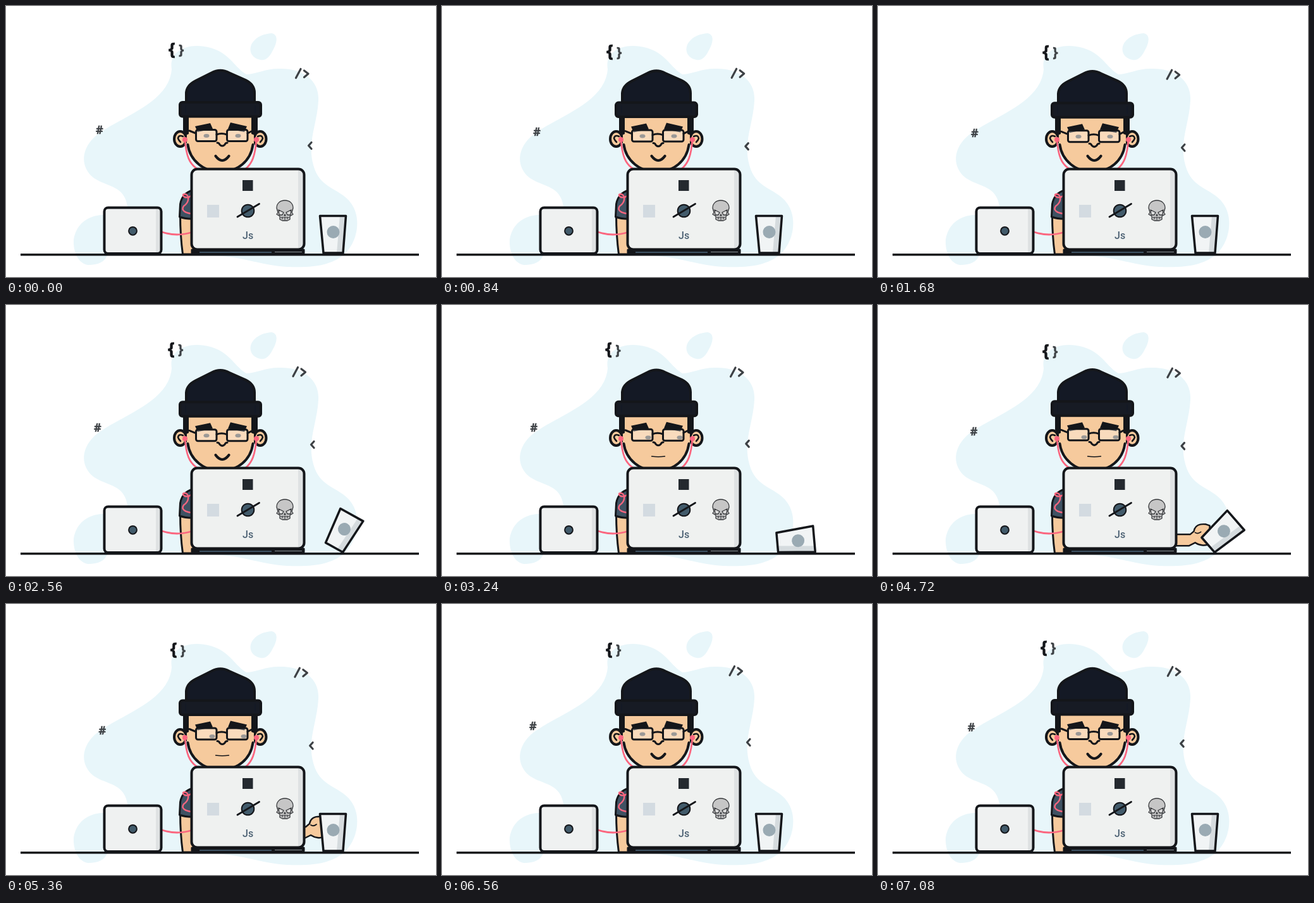
Animation, 680 px wide and 428 px high, one loop 7120 ms. Source, as an HTML page:

```html
<!DOCTYPE html>
<html lang="en">
<head>
<meta charset="utf-8">
<title>Coder at a desk</title>
<style>
  html, body { margin: 0; width: 100%; height: 100%; overflow: hidden; background: #fff; }
  svg { display: block; width: 680px; height: 428px; }
  .o { stroke: #14161a; stroke-width: 4; stroke-linejoin: round; stroke-linecap: round; }
  .n { fill: none; }
  .skin { fill: #f6ca9d; }
  .pink { fill: none; stroke: #fb667f; stroke-width: 2.8; stroke-linecap: round; }
  .sign { fill: none; stroke: #3d4145; stroke-width: 3.2; stroke-linejoin: round; stroke-linecap: round; }
  text { font-family: "Open Sans", "Noto Sans", sans-serif; font-weight: 700; fill: #3d4145; }
</style>
</head>
<body>
<svg viewBox="0 0 680 428">
  <!-- backdrop -->
  <g fill="#e8f6fa">
    <path d="M262 100C258 78 275 63 302 63C350 64 358 95 380 108C398 107 412 98 435 99C470 99 496 118 494 150C492 187 476 215 486 251C496 290 530 288 546 312C562 334 557 372 535 392C512 412 478 413 445 412C405 410 380 397 330 394H192V316C186 276 146 288 129 261C115 239 128 212 152 198C188 173 258 151 262 100Z"/>
    <path d="M160 394C156 404 146 409 130 409C114 407 106 388 107 369C111 344 130 331 152 330H172V394Z"/>
    <path d="M420 43C431 45 429 58 422 70C417 80 411 87 402 85C388 82 383 70 389 59C396 48 408 44 420 43Z"/>
  </g>

  <!-- floating signs -->
  <g id="braces">
    <text x="257" y="76.500" font-size="27" style="fill:#14161a;stroke:#14161a;stroke-width:.6">{</text>
    <text x="273" y="76" font-size="21" stroke="#3d4145" stroke-width=".4">}</text>
  </g>
  <g id="hash"><text x="142" y="201.700" font-size="18" stroke="#3d4145" stroke-width=".4">#</text></g>
  <g id="tag"><path class="sign" d="M458.500 113.500L466 99.500M471.500 102L478 107L471.500 112.500"/></g>
  <g id="less"><path class="sign" d="M483 215.500L478.500 220.500L483 225.500"/></g>

  <!-- body -->
  <g class="o" style="stroke-width:3">
    <path class="skin" d="M275.500 330Q275.500 362 279.500 392H310V330Z"/>
    <path fill="#3f5263" d="M300 290Q279 293 275.500 313L274.500 333Q285 337 300 336Z"/>
  </g>

  <!-- head -->
  <g class="o skin">
    <ellipse cx="275.500" cy="210" rx="9.500" ry="12"/>
    <ellipse cx="402" cy="210" rx="9.500" ry="12"/>
    <path class="n" style="fill:none;stroke-width:2.500" d="M280 206Q273 203 272 209Q273 212 276 215M398 206Q405 203 406 209Q405 212 402 215"/>
    <path stroke="none" style="stroke:none" d="M286 170V217C290 245 314 262 339 262C366 262 388 245 392 217V170Z"/>
    <path class="n" style="fill:none" d="M287.500 219C291 245 314 262 339 262C366 262 387 245 390.500 219"/>
  </g>
  <path fill="#14161a" d="M280 172H289V202L285 204L280 197ZM388 172H398V197L393 204L388 202Z"/>
  <g id="head">
    <path fill="#14161a" d="M299 190L323 185L327 194L303 199ZM381 190L355 184L351 194L377 199Z"/>
    <g id="eyes" fill="#6c6865">
      <ellipse cx="317" cy="205" rx="4.500" ry="3"/>
      <ellipse cx="367" cy="205" rx="4.500" ry="3"/>
    </g>
    <g class="o" style="stroke-width:3" fill="#fff" fill-opacity=".32">
      <rect x="300.500" y="195.500" width="32.500" height="18" rx="3"/>
      <rect x="349.500" y="195.500" width="32.500" height="18" rx="3"/>
      <path class="n" d="M333 203Q341 200 349 203M300 201L290 197M382 201L390 197"/>
    </g>
    <path class="o n" style="stroke-width:3" d="M334 216Q337 216 338 219Q342 223 346 219Q347 216 350 216"/>
    <path class="o" fill="#141925" d="M285 155V137Q286 125 300 118L325 105.500Q339 98 353 105.500L379 117Q393 124 393 137V155Z"/>
    <rect class="o" x="275" y="152" width="128" height="22.500" rx="4" fill="#171b24"/>
    <path stroke="#141925" stroke-width="2" d="M284 157V169M394 157V169"/>
  </g>
  <path id="mouth" class="o n"/>

  <!-- earphones -->
  <path class="pink" d="M283 211C285 237 290 249 302 257M396 211C394 237 389 249 379 257"/>
  <g fill="#fb667f"><circle cx="283" cy="211" r="4"/><circle cx="396" cy="211" r="4"/></g>
  <path class="pink" style="stroke-width:2.300" d="M294 299C284 307 276 298 282 297C290 297 291 309 281 316C276 323 284 327 294 328"/>

  <path class="o n" style="stroke-width:3.500;stroke-linecap:butt" d="M23 392.700H653"/>

  <!-- reaching hand -->
  <g id="hand">
    <path class="o skin" style="stroke-width:2.500" d="M405 352H474L480 347C482 337 489 335 499 336L505 338V367C497 371 488 369 482 365L472 370H405Z"/>
    <path class="o n" style="stroke-width:1.800" d="M482 349Q486 352 491 348"/>
  </g>

  <!-- cup -->
  <g id="cup">
    <path fill="#f1f4f5" d="M496 331H538L533 390H502Z"/>
    <path fill="#d5dbde" d="M528 331H538L533 390H523Z"/>
    <circle cx="517.500" cy="357" r="10" fill="#9aaab3"/>
    <path class="o n" style="stroke-width:3.500" d="M496.500 331.500H537.500L533 390H502Z"/>
  </g>

  <!-- small laptop -->
  <path class="pink" d="M247 357Q270 365 295 357"/>
  <rect x="155.500" y="318.500" width="90" height="72.500" rx="6" fill="#eff1f1"/>
  <path fill="#dfe2e3" d="M237 320H241Q245 320 245 325V386Q245 390 241 390H237Z"/>
  <rect class="o n" x="155.500" y="318.500" width="90" height="72.500" rx="6"/>
  <circle class="o" style="stroke-width:2" cx="200.500" cy="355.300" r="6.400" fill="#425b6b"/>

  <!-- large laptop -->
  <path class="o" style="stroke-width:3" fill="#14161a" d="M294 385H471V390H294Z"/>
  <path stroke="#3f5364" stroke-width="2" d="M306 389H420"/>
  <path stroke="#8f979c" d="M425 388.500H468"/>
  <rect x="293.500" y="257.500" width="178" height="127" rx="9" fill="#eff1f0"/>
  <path fill="#dfe2e3" d="M462 259H464Q470 260 470 267V376Q470 383 463 383H462Z"/>
  <rect class="o n" x="293.500" y="257.500" width="178" height="127" rx="9"/>
  <rect x="374" y="275" width="16.500" height="17" fill="#24292f"/>
  <rect x="318" y="314" width="19" height="20" fill="#d3dbe1"/>
  <circle class="o" style="stroke-width:2" cx="382.500" cy="323.500" r="9.800" fill="#425b6b"/>
  <path class="o" style="stroke-width:2.800" d="M366 333L400.500 312.500"/>
  <text x="374" y="367.500" font-size="16" style="font-family:Roboto,sans-serif;font-weight:500;fill:#4b6072">Js</text>

  <!-- skull sticker -->
  <g stroke="#35373a" stroke-width="1.300" stroke-linejoin="round">
    <path fill="#c6c6c6" d="M441 307C449 307 454 312 454 319L452 326L454 329L449 332V337L445 339H437L433 337V332L428 329L430 326L428 319C428 312 433 307 441 307Z"/>
    <path fill="#dadada" d="M431 322L439 326L437 330H432ZM451 322L443 326L445 330H450Z"/>
    <path fill="#35373a" d="M441 329L440 331H442Z"/>
    <path fill="none" stroke-width="1" d="M434 334H448M437 333V337M441 333V338M445 333V337"/>
  </g>
</svg>

<script>
const LOOP = 7120, DRIFT = 3560, STEP = 40;
const $ = id => document.getElementById(id);
const clamp = v => Math.max(0, Math.min(1, v));
const line = (t, a, b) => clamp((t - a) / (b - a));
const ease = (t, a, b) => { const p = line(t, a, b); return p * p * (3 - 2 * p); };
const mix = (a, b, p) => a + (b - a) * p;
const move = (id, x, y) => $(id).setAttribute('transform', `translate(${x} ${y})`);

// Smooth periodic curve through [time, x, y] points.
function curve(keys, period, t) {
  t %= period;
  const n = keys.length;
  const at = i => {
    const turn = Math.floor(i / n), [k, ...v] = keys[i - turn * n];
    return [k + turn * period, ...v];
  };
  let i = n - 1;
  while (keys[i][0] > t) i--;
  const [a, b, c, d] = [at(i - 1), at(i), at(i + 1), at(i + 2)];
  const h = c[0] - b[0], p = (t - b[0]) / h;
  return [1, 2].map(k => {
    const m = (c[k] - a[k]) / (c[0] - a[0]) * h;
    const q = (d[k] - b[k]) / (d[0] - b[0]) * h;
    return b[k] + p * m + p * p * (3 * (c[k] - b[k]) - 2 * m - q)
      + p * p * p * (2 * (b[k] - c[k]) + m + q);
  });
}

const drifts = {
  braces: [[0, 0, 0], [440, 2.5, 2], [1000, 3, 4], [1740, 3, 4], [2350, -1, .3], [2560, -1, 1], [3000, 2, 3]],
  hash: [[0, 0, 0], [440, 0, 2], [1000, 3, 4], [1740, 4.8, 4.7], [2560, -3, -2], [3000, -4, -3]],
  tag: [[0, 0, 0], [440, 0, -1], [1740, -1.5, 1.7], [2560, -4.5, -1], [3000, -3.5, -1]],
  less: [[0, 0, 0], [440, 1, 0], [1740, 2, 3.3], [2560, 4, 0], [3000, 4, -2]]
};
const bob = [[0, 0, 0], [1680, 0, 1.3], [2560, 0, 1.3], [4000, 0, .2], [5360, 0, .5], [6560, 0, .5]];

function draw(t) {
  for (const id in drifts) move(id, ...curve(drifts[id], DRIFT, t));
  move('head', ...curve(bob, LOOP, t));

  const worry = ease(t, 2800, 3040) - ease(t, 5720, 5960);
  move('eyes', 9 * worry, 3.5 * worry);
  const y = mix(237, 239, worry);
  $('mouth').setAttribute('d', `M331.500 ${y}Q342 ${mix(251, 240.5, worry)} 352.500 ${y}`);
  $('mouth').style.strokeWidth = mix(4.2, 1.3, worry);

  const lift = ease(t, 4450, 5050);
  const angle = 85 * (line(t, 2200, 2880) ** 1.7 - lift);
  $('cup').setAttribute('transform', `rotate(${angle} 532 389.5)`);

  const reach = ease(t, 4050, 4420), away = ease(t, 5450, 5850);
  move('hand', -50 + 84 * reach - 34 * lift + 50 * lift - 50 * away - 50 * (reach - 1) * 0 - 50 * lift + 0, 18 * (reach - lift));
}

let start;
function tick(now) {
  start ??= now;
  draw(Math.floor((now - start) % LOOP / STEP) * STEP);
  requestAnimationFrame(tick);
}
draw(0);
requestAnimationFrame(tick);
</script>
</body>
</html>
```
